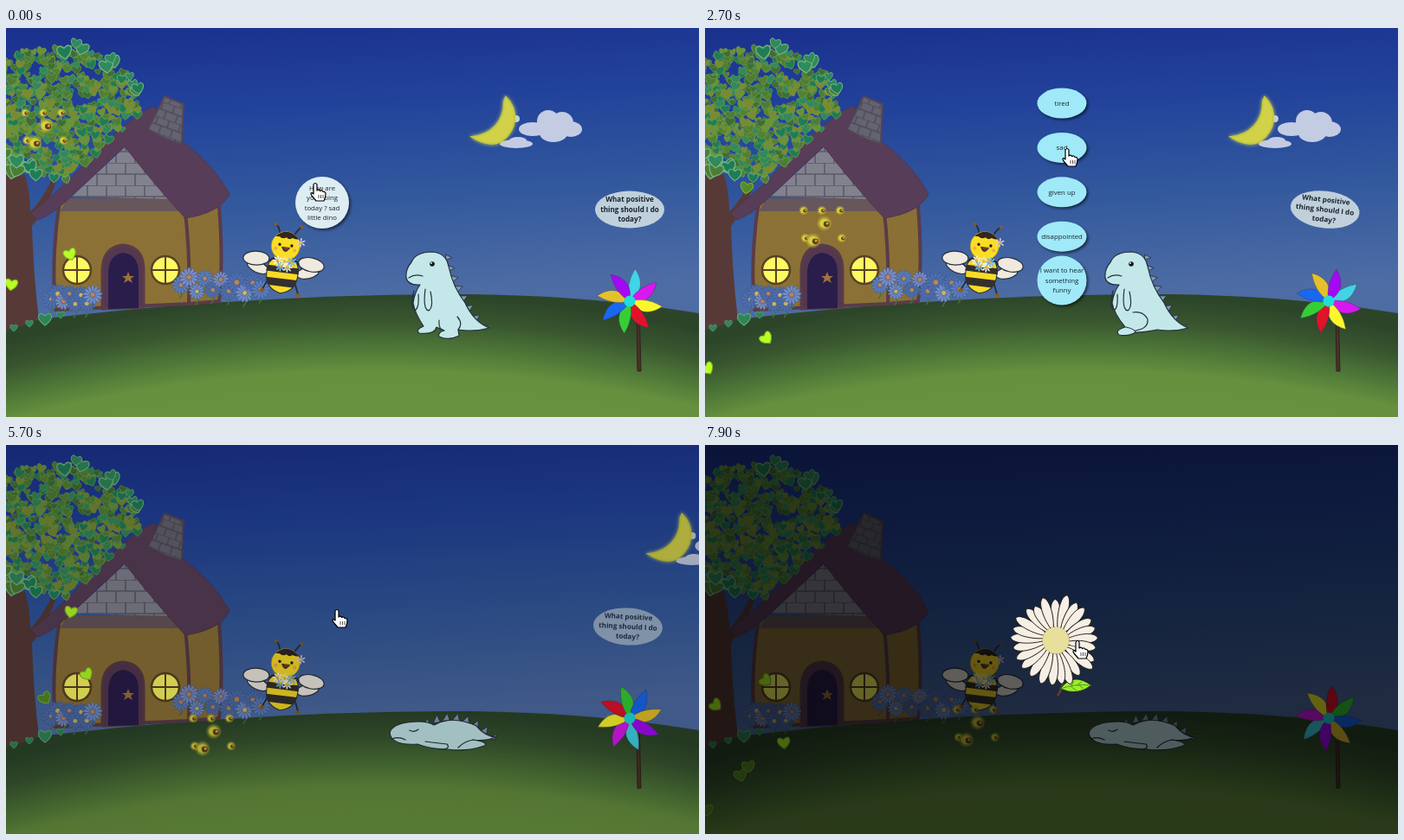
An HTML page that plays this animation: 800x450 px, repeating every 8000 ms.

```html
<!DOCTYPE html>
<html lang="en">
<head>
<meta charset="utf-8">
<title>Sad little dino</title>
<style>
html, body { margin: 0; width: 100%; height: 100%; overflow: hidden; background: #1b318b; }
svg { display: block; width: 100vw; height: 100vh; }
text { font: 7.8px "Open Sans", "Noto Sans", sans-serif; text-anchor: middle; fill: #17222d; }
.bold text { font-weight: 700; font-size: 8.1px; }
.ink { stroke: #252f3c; stroke-width: 1.2; stroke-linejoin: round; stroke-linecap: round; }
.line { fill: none; }
.shade { filter: drop-shadow(2px 2px 1.5px #0008); }
</style>
</head>
<body>
<svg viewBox="0 0 800 450" preserveAspectRatio="none">
<defs>
  <linearGradient id="sky" x1="0" y1="0" x2="0" y2="330" gradientUnits="userSpaceOnUse" gradientTransform="rotate(-3)">
    <stop stop-color="#1a308c"/><stop offset=".3" stop-color="#21419a"/>
    <stop offset=".65" stop-color="#32589d"/><stop offset="1" stop-color="#4d6ca4"/>
  </linearGradient>
  <radialGradient id="grass" cx="430" cy="2000" r="1692" gradientUnits="userSpaceOnUse">
    <stop offset=".93" stop-color="#68923f"/><stop offset=".948" stop-color="#668f3e"/>
    <stop offset=".963" stop-color="#4f7838"/><stop offset=".983" stop-color="#38552f"/>
    <stop offset="1" stop-color="#2c4529"/>
  </radialGradient>
  <radialGradient id="glow">
    <stop stop-color="#f4ee50"/><stop offset=".55" stop-color="#c9c23a" stop-opacity=".8"/>
    <stop offset="1" stop-color="#b5b030" stop-opacity="0"/>
  </radialGradient>
  <pattern id="bricks" width="22" height="26" patternUnits="userSpaceOnUse">
    <rect width="22" height="26" fill="#82828f"/>
    <path d="M0 0H22M0 13H22M6 0V13M17 13V26" stroke="#5a5969" stroke-width="1.6"/>
  </pattern>
  <pattern id="chimney" width="14" height="18" patternUnits="userSpaceOnUse" patternTransform="rotate(20)">
    <rect width="14" height="18" fill="#64636f"/>
    <path d="M0 0H14M0 9H14M4 0V9M11 9V18" stroke="#4b495a" stroke-width="1.4"/>
  </pattern>
  <path id="heart" d="M0 5C-9 -1 -5 -8 0 -3C5 -8 9 -1 0 5Z"/>
  <g id="fly">
    <circle r="11" fill="url(#glow)"/>
    <ellipse rx="6.5" ry="5.5" fill="#d9cf3c"/>
    <ellipse cx="3" cy="1" rx="4.2" ry="4" fill="#59451d"/>
    <circle cx="4" r="1.8" fill="#e7a03a"/>
  </g>
</defs>

<rect width="800" height="450" fill="url(#sky)"/>

<g id="moon">
  <g fill="#c4cce4">
    <ellipse cx="608" cy="117" rx="16" ry="8"/><circle cx="626" cy="108" r="13"/>
    <circle cx="642" cy="110" r="13"/><ellipse cx="652" cy="117" rx="13" ry="9"/>
    <ellipse cx="632" cy="122" rx="16" ry="10"/>
    <ellipse cx="589" cy="134" rx="19" ry="5"/><ellipse cx="591" cy="130" rx="10" ry="4"/>
    <circle cx="589" cy="105" r="4"/>
  </g>
  <path d="M577 80C592 95 590 118 572 131C562 137 547 132 538 126C560 124 576 108 575 85Z"
    fill="#d2d14a" stroke="#c6cb3c" stroke-width="2" style="filter:drop-shadow(0 0 2px #d8dc50)"/>
</g>

<path d="M0 342Q250 308 540 308Q680 310 800 330V450H0Z" fill="url(#grass)"/>
<path d="M0 160L22 170Q28 190 28 212Q42 200 57 166L61 168Q50 205 30 229Q32 290 38 336Q20 346 0 349Z" fill="#573a38"/>

<g stroke="#593c48" stroke-width="4" stroke-linejoin="round">
  <path d="M205 212L246 206Q251 270 246 316L211 319Z" fill="#8b7035"/>
  <path d="M62 200Q52 265 57 326L211 319Q213 260 206 205Z" fill="#8c7136"/>
  <path d="M72 197H196L206 212H62Z" fill="#67565a" stroke="none"/>
  <path d="M137 138L76 195L196 198Z" fill="url(#bricks)" stroke="none"/>
  <path d="M29 214Q75 178 110 135L152 101L170 90L202 130Q240 158 258 192Q247 214 207 220Q172 182 137 137L75 195Q55 215 37 222Z"
    fill="#583d58" stroke="#503650" stroke-width="1"/>
  <path d="M183 79L205 88L203 134Q183 129 164 117Z" fill="url(#chimney)" stroke="#554359" stroke-width="2"/>
  <path d="M111 325V280Q112 253 135 251Q159 253 159 280V323Z" fill="#553750" stroke-width="3"/>
  <path d="M118 325V283Q119 262 135 260Q153 262 153 283V324Z" fill="#291d4b" stroke="none"/>
  <path d="M141 282L143 287L148 287L144 290L146 295L141 292L136 295L138 290L134 287L139 287Z" fill="#a1713c" stroke="none"/>
</g>
<g id="windows" fill="#fcfa62" stroke="#5b4124" stroke-width="2.5"></g>
<g id="leaves"></g>
<g id="garden"></g>

<g id="bee" class="ink">
  <g fill="#efe9df" id="wings"></g>
  <path class="line" d="M312 240Q311 232 306 228M328 240Q331 232 336 228M304 294L299 305M336 294L341 306" stroke-width="1.8"/>
  <g fill="#8b5a22" stroke="none"><circle cx="306" cy="228" r="2"/><circle cx="336" cy="228" r="2"/>
    <ellipse cx="299" cy="306" rx="3" ry="2"/><ellipse cx="341" cy="307" rx="3" ry="2"/></g>
  <path d="M302 282Q302 264 320 264Q338 264 338 282Q339 303 320 307Q301 303 302 282Z" fill="#f9db26" stroke-width="1"/>
  <path d="M302 276H338L339 283H301ZM302 290H338Q336 296 334 299H306Q303 296 302 290Z" fill="#33302c" stroke="none"/>
  <circle cx="320" cy="252" r="16.5" fill="#fadd25" stroke="#b89a22" stroke-width=".6"/>
  <path d="M307 242Q320 229 334 242Q331 244 327 242Q323 245 320 242Q315 245 312 242Z" fill="#33251f" stroke="none"/>
  <circle cx="313" cy="251" r="1.7" fill="#201a15" stroke="none"/><circle cx="327" cy="251" r="1.7" fill="#201a15" stroke="none"/>
  <path d="M316 254Q320 263 325 254Z" fill="#7b2f25" stroke-width=".8"/>
  <circle cx="309" cy="256" r="2" fill="#f5a849" stroke="none"/><circle cx="331" cy="256" r="2" fill="#f5a849" stroke="none"/>
  <path class="line" d="M304 271Q309 264 315 273M337 271Q332 264 326 273" stroke-width="2.5"/>
  <g id="bouquet" stroke="none"></g>
</g>

<g id="dino" class="ink" fill="#c4e8e9"></g>

<path d="M728 322H731L733 397H729Z" fill="#4b3129" stroke="#30211d"/>
<g id="wheel"></g>

<g id="wish" class="bold"></g>
<g id="ask"></g>
<g id="menu"></g>
<g id="offer"></g>
<g id="falling"></g>
<g id="swarm"></g>

<rect id="night" width="800" height="450"/>
<g id="daisy" stroke="#221d18" stroke-width=".9"></g>

<g id="cursor" fill="#fff" stroke="#000" stroke-width="1.2" stroke-linejoin="round">
  <g id="hand">
    <path d="M-2 1Q0 -2 2 1V8Q4 6 5.5 8.5Q8 7 9 9.5Q12 9 12 12L11.5 16L10 20H1L-4 14Q-6 11 -4 10.5L-2 12Z"/>
    <path d="M4 13V17M6.5 13V17M9 13V17" stroke-width=".7"/>
  </g>
  <path id="arrow" d="M0 0V15L3.5 12L6 17.5L8.5 16.5L6 11H10.5Z"/>
</g>
</svg>

<script>
const $ = id => document.getElementById(id);
const fill = (id, html) => { $(id).innerHTML = html; };
const show = (id, on) => { $(id).style.display = on ? "" : "none"; };
const place = (id, value) => $(id).setAttribute("transform", value);

let seed = 11;
const rnd = (lo = 0, hi = 1) => lo + (hi - lo) * ((seed = seed * 16807 % 2147483647) / 2147483647);
const pick = list => list[Math.floor(rnd(0, list.length))];
const times = (n, fn) => Array.from({ length: n }, (_, i) => fn(i)).join("");

const heart = (x, y, s, color, edge, turn = 0) =>
  `<use href="#heart" transform="translate(${x} ${y}) rotate(${turn}) scale(${s})" fill="${color}" stroke="${edge}" stroke-width=".8"/>`;

const bloom = (x, y, r, n, color, core) =>
  `<g transform="translate(${x} ${y})">` + times(n, i =>
    `<ellipse cy="${-r * .62}" rx="${r * .16}" ry="${r * .4}" fill="${color}" transform="rotate(${i * 360 / n})"/>`) +
  `<circle r="${r * .27}" fill="${core}"/></g>`;

const lines = (x, y, rows) => rows.map((row, i) =>
  `<text x="${x}" y="${y + (i - (rows.length - 1) / 2) * 11.4 + 2.8}">${row}</text>`).join("");

const bubble = (x, y, rx, ry, color, rows) =>
  `<ellipse class="shade" cx="${x}" cy="${y}" rx="${rx}" ry="${ry}" fill="${color}"/>` + lines(x, y, rows);

// Scenery
fill("windows", [82, 184].map(x =>
  `<circle cx="${x}" cy="280" r="16"/><path d="M${x - 16} 280h32M${x} 264v32" stroke-width="2"/>`).join(""));

const greens = ["#1f7d55", "#2f8a5c", "#4d7d35", "#6a9237", "#7b8a30", "#3f6d33", "#55802f"];
const leaf = (reach, size, color, edge) => {
  const a = rnd(0, 6.283);
  const x = 58 + 102 * reach * Math.cos(a), y = 96 + 80 * reach * Math.sin(a);
  const overRoof = x > 170 - Math.max(0, y - 85) * 1.1;
  return overRoof ? "" : heart(x, y, size, color, edge, rnd(-25, 25));
};
fill("leaves",
  times(620, () => leaf(Math.sqrt(rnd()) * .95, rnd(.6, 1.15), pick(greens), "#6c984c")) +
  times(40, () => leaf(rnd(.85, 1.02), rnd(.8, 1.7), pick(greens.slice(0, 3)), "#75b583")));

const blues = ["#5b80c0", "#7390cc", "#4d6fae", "#7f8fc4"];
const bed = (n, left, right, top, bottom) => times(n, i => {
  const x = left + (right - left) * i / (n - 1), y = i % 2 ? rnd(top, top + 8) : rnd(bottom - 10, bottom);
  return `<path d="M${x} ${y}q4 10 -2 16" stroke="#496f3c" stroke-width="1.5" fill="none"/>` +
    `<g stroke="#41578c" stroke-width=".5">${bloom(x, y, rnd(9, 12), 13, pick(blues), pick(["#c9b562", "#b98756"]))}</g>`;
});
fill("garden", bed(8, 53, 100, 303, 322) + bed(11, 202, 294, 288, 307) +
  times(4, i => heart(9 + i * 18, 347 - i * 5, .8 + .6 * (i === 2), "#2f8558", "#62aa79")));

fill("wings", [-1, 1].map(d =>
  `<ellipse cx="${320 + 29 * d}" cy="280" rx="13" ry="6.5" transform="rotate(${-18 * d} ${320 + 29 * d} 280)"/>` +
  `<ellipse cx="${320 + 32 * d}" cy="270" rx="15" ry="8" transform="rotate(${5 * d} ${320 + 32 * d} 270)"/>`).join(""));
fill("bouquet", times(5, i => bloom(313 + i * 4, 271 + (i % 2 ? 5 : -1), 6, 8, ["#f4f1e4", "#7ebbe0", "#f6e9a8"][i % 3], "#e4b534")) +
  bloom(337, 246, 5.5, 6, "#e6cbd8", "#eac85d"));

// Dino: spikes follow a quadratic curve along the back
const spikes = (a, b, c) => times(8, i => {
  const k = i / 7, mix = j => (1 - k) ** 2 * a[j] + 2 * k * (1 - k) * b[j] + k * k * c[j];
  const slope = j => (1 - k) * (b[j] - a[j]) + k * (c[j] - b[j]);
  const turn = Math.atan2(slope(1), slope(0)) * 57.3, h = 5 + 4 * Math.sin(k * Math.PI);
  return `<path d="M${-h * .6} 2L1 ${-h}L${h * .6} 2Z" transform="translate(${mix(0)} ${mix(1)}) rotate(${turn})" fill="#8199b3" stroke-width=".8"/>`;
});
const ink = d => `<path class="line" d="${d}"/>`;
const sitting = (feet, legs) => spikes([510, 265], [512, 310], [552, 346]) +
  `<path d="M468 271Q473 259 492 259Q508 260 511 276Q516 300 530 318Q540 340 558 347Q540 352 522 349${feet}Q472 330 470 318Q472 305 478 297Q464 298 462 289Q461 279 468 271Z"/>` +
  ink("M465 289Q472 284 481 287M471 304Q466 325 473 326Q477 323 476 308M484 302Q481 326 488 327Q494 323 490 305" + legs) +
  `<circle cx="492" cy="273" r="2.8" fill="#12161d" stroke="none"/><circle cx="491" cy="272" r=".9" fill="#fff" stroke="none"/>`;
const poses = {
  stand: sitting("L523 356Q511 362 500 357Q498 352 506 350L497 346Q495 355 477 353Q472 349 482 345",
    "M505 350Q499 348 500 338M522 349Q528 342 521 334"),
  step: sitting("Q508 352 497 352Q490 357 478 355Q472 350 485 346",
    "M486 346Q496 348 497 352M497 350Q512 348 511 337Q506 327 494 329"),
  droop: spikes([484, 291], [530, 305], [566, 344]) +
    `<path d="M464 318Q467 296 487 291Q498 291 506 303Q530 312 540 322Q556 342 572 345Q556 350 542 347L540 365Q534 368 530 363L532 350Q526 346 522 351L523 360Q517 363 515 357L513 346Q500 344 492 333Q470 336 463 327Z"/>` +
    ink("M478 305Q483 308 489 304M466 326Q472 321 480 326M496 320Q505 340 512 338Q516 334 506 322M491 335Q496 349 502 346"),
  sleep: spikes([486, 321], [525, 311], [563, 338]) +
    `<path d="M443 333Q445 324 463 321Q485 318 494 324Q515 312 543 325Q553 337 566 338Q552 343 539 341Q558 344 552 348Q532 355 510 352Q490 352 475 346Q445 348 443 333Z"/>` +
    ink("M466 330Q471 333 476 329M446 340Q453 337 461 341M484 343Q500 345 509 346Q513 350 506 352M522 350Q530 342 540 341")
};

// Pinwheel, clockwise from the top
const blades = ["#40d4e6", "#d818f0", "#fcf72c", "#e2122a", "#35cf35", "#1768f2", "#e4c12c", "#a508f5"];
fill("wheel", blades.map((c, i) =>
  `<path d="M0 0Q-7 -18 3 -38Q20 -17 0 0Z" fill="${c}" stroke="#3d3b58" stroke-width=".4" transform="rotate(${i * 45})"/>`).join("") +
  `<circle r="6.5" fill="#20ded9"/>`);

// Speech
fill("wish", `<ellipse rx="40" ry="21.5" fill="#dbe6e8" opacity=".84"/>` + lines(0, 0, ["What positive", "thing should I do", "today?"]));
fill("ask", bubble(365, 202, 31, 30, "#deedf2", ["How are", "you doing", "today ? sad", "little dino"]));
fill("offer", bubble(365, 202, 31, 30, "#deedf2", ["Come here,", "I have", "something", "for you!"]));
fill("menu", ["tired", "sad", "given up", "disappointed"].map((word, i) =>
  bubble(412, 87 + i * 51.4, 28.5, 17.5, "#9fe9f8", [word])).join("") +
  bubble(412, 292, 28.5, 28.5, "#9fe9f8", ["I want to hear", "something", "funny"]));

// Gift flower, drawn around its centre
fill("daisy", `<path d="M2 64Q7 58 8 46" stroke="#5b3d23" stroke-width="3" fill="none"/>` +
  `<path d="M5 56Q20 36 41 52Q25 65 5 56Z" fill="#9bee2b"/><path d="M5 56Q22 50 41 52M17 54L21 47M24 52L30 48M18 54L25 59M27 52L32 56" fill="none" stroke="#4d8a1c"/>` +
  times(25, i => {
    const r = rnd(46, 54);
    return `<path d="M0 -11C-5 -20 -9 ${-r + 4} 0 ${-r}C9 ${-r + 4} 5 -20 0 -11Z" fill="#f6efe5" transform="rotate(${i * 14.4 + rnd(-3, 3)})"/>`;
  }) +
  `<circle r="15.5" fill="#e8df9c" stroke="#b7a75c" stroke-dasharray="2 1.5"/>`);

// Motion
const ramp = (t, from, to) => Math.min(1, Math.max(0, (t - from) / (to - from)));
const within = (t, a, b) => t >= a && t < b;
const track = (t, ...keys) => keys.slice(1).reduce((v, [ms, value], i) =>
  v + (value - keys[i][1]) * ramp(t, keys[i][0], ms), keys[0][1]);

// The pointer glides to each stop just before its time, then rests
const stops = [[0, 357, 180], [800, 384, 209], [2300, 418, 140], [4000, 430, 93], [4700, 382, 191], [7500, 430, 227]];
const pointer = (t, axis) => stops.reduce((v, stop) => v + (stop[axis] - v) * ramp(t, stop[0] - 700, stop[0]), 0);

// Falling hearts: start time, x, y at the start, colour
const lime = "#b5ff22", moss = "#528c28";
const drops = [[0, 74, 262, lime], [0, 6, 297, lime], [2700, 48, 185, moss], [5300, 73, 179, lime],
  [5600, 93, 262, lime], [6000, 2, 354, moss], [6700, 10, 258, lime], [7000, 38, 350, moss]];

const flock = Array.from({ length: 6 }, (_, i) => [i % 3 * 21 - 24 + (i > 2 ? 2 : 0), i > 2 ? 17 : -15, .53]);
flock.push([0, 0, .85], [-13, 20, .85]);
flock.splice(4, 1);
fill("swarm", flock.map(([x, y, s]) => `<use href="#fly" transform="translate(${x} ${y}) scale(${s})"/>`).join(""));

function draw(t) {
  place("moon", `translate(${track(t, [0, 0], [800, 28], [2700, 69], [4000, 143], [8000, 285])})`);
  place("wheel", `translate(720 316) rotate(${track(t, [0, 5], [4000, 78], [6300, 189], [8000, 227])})`);
  place("swarm", `translate(${46 + .034 * t} ${track(t, [0, 113], [4900, 318], [6300, 341], [7900, 321])})`);

  const sway = Math.sin(Math.PI * t / 6700);
  place("wish", `translate(${720 - 4.5 * sway} 210) rotate(${7 * sway})`);
  place("bee", `rotate(${t % 2300 > 1300 ? 0 : 7} 320 275)`);

  const pose = t >= 5400 ? "sleep" : t >= 4500 ? "droop" : t % 1000 < 500 ? "stand" : "step";
  if (pose !== draw.pose) fill("dino", poses[draw.pose = pose]);

  show("ask", t < 1500);
  show("menu", within(t, 1500, 3800));
  show("offer", within(t, 3800, 5600));

  const dark = ramp(t, 5500, 6200);
  $("night").style.opacity = .6 * dark;
  $("wish").style.opacity = 1 - dark;

  fill("falling", drops.filter(([born]) => t >= born).map(([born, x, y, color], i) =>
    heart(x + 3 * Math.sin((t - born) / 600), y + .036 * (t - born), 1.35, color, "#7fae2e", 30 * Math.sin(t / 700 + i * 2) - 20)).join(""));

  show("daisy", t >= 6700);
  place("daisy", `translate(405 226) scale(${1 - (1 - ramp(t, 6600, 7200)) ** 2})`);

  const arrow = within(t, 3800, 4500);
  show("hand", !arrow);
  show("arrow", arrow);
  place("cursor", `translate(${pointer(t, 1)} ${pointer(t, 2)})`);
}

const start = performance.now();
function tick() {
  const t = (performance.now() - start) % 8000;
  draw(Math.floor(t / 100) * 100);
  requestAnimationFrame(tick);
}
tick();
</script>
</body>
</html>
```
